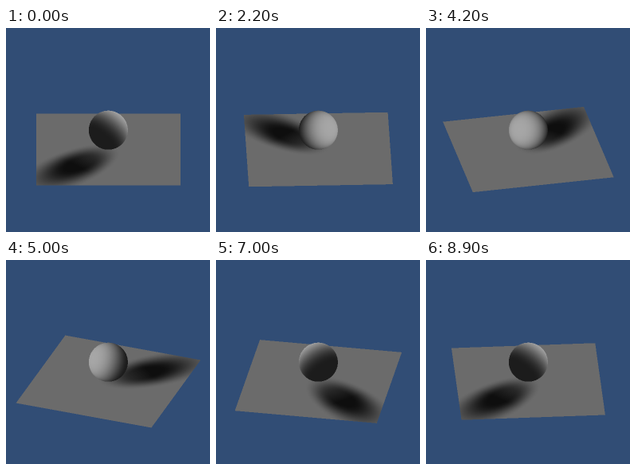
An HTML page with a canvas for the animation above (9000 ms loop, 256 by 256 pixels).

```html
<!DOCTYPE html>
<html lang="en">
<head>
<meta charset="utf-8">
<title>Orbiting sphere</title>
<style>
html, body { margin: 0; width: 100%; height: 100%; overflow: hidden; background: #314d75; }
canvas { display: block; width: 256px; height: 256px; }
</style>
</head>
<body>
<canvas id="stage" width="256" height="256"></canvas>
<script>
const SIZE = 256, STEP = 100, STEPS = 90;
const BG = [49, 77, 117];
const RAD = Math.PI / 180;
const HALF = 90.4;                      // half the floor's side
const FLOOR = { x: 128.4, y: 152.5 };
const BALL = { x: 128.4, y: 128.2, r: 24.5 };
const SIN = 0.5, COS = Math.cos(30 * RAD); // camera pitch
const LIFT = (FLOOR.y - BALL.y) / COS;
const SUN = { yaw: -45, pitch: 29 };
const SUB = [0.25, 0.75];

const ctx = document.getElementById('stage').getContext('2d');
const image = ctx.createImageData(SIZE, SIZE);
const clamp = v => Math.max(0, Math.min(1, v));

function smooth(from, to, v) {
  const p = clamp((v - from) / (to - from));
  return p * p * (3 - 2 * p);
}

function sunAt(angle) {
  const yaw = SUN.yaw * RAD + angle, pitch = SUN.pitch * RAD;
  return [Math.cos(yaw) * Math.cos(pitch), Math.sin(yaw) * Math.cos(pitch), Math.sin(pitch)];
}

// Gray of the ball, or -1 outside it
function ballGray(x, y, sun) {
  const u = (x - BALL.x) / BALL.r, v = (BALL.y - y) / BALL.r;
  const rest = 1 - u * u - v * v;
  if (rest < 0) return -1;
  const w = Math.sqrt(rest);
  const dot = u * sun[0] + (w * COS - v * SIN) * sun[1] + (v * COS + w * SIN) * sun[2];
  return 28 + 140 * smooth(-0.6, 1.1, dot);
}

// Gray of the floor with the ball's soft shadow, or -1 outside it
function floorGray(x, y, sun, c, s) {
  const gx = x - FLOOR.x, gy = (y - FLOOR.y) / SIN;
  if (Math.abs(gx * c + gy * s) > HALF || Math.abs(gy * c - gx * s) > HALF) return -1;
  // distance towards the sun, and how far that ray misses the ball
  const along = -gx * sun[0] - gy * sun[1] + LIFT * sun[2];
  const gap = Math.sqrt(gx * gx + gy * gy + LIFT * LIFT - along * along) - BALL.r;
  const blur = 6 + 0.15 * Math.max(0, along);
  const shade = clamp(0.3 + along / 90) * (1 - smooth(-14, blur, gap));
  return 107 - 93 * shade;
}

function draw(step) {
  const angle = step * 360 / STEPS * RAD;
  const c = Math.cos(angle), s = Math.sin(angle), sun = sunAt(angle);
  const px = image.data;
  for (let y = 0, i = 0; y < SIZE; y++) {
    for (let x = 0; x < SIZE; x++, i += 4) {
      let gray = 0, hits = 0;
      if (y > 84 && y < 220) {
        for (const dy of SUB) for (const dx of SUB) {
          let g = ballGray(x + dx, y + dy, sun);
          if (g < 0) g = floorGray(x + dx, y + dy, sun, c, s);
          if (g >= 0) { gray += g; hits++; }
        }
      }
      for (let k = 0; k < 3; k++) px[i + k] = (gray + BG[k] * (4 - hits)) / 4;
      px[i + 3] = 255;
    }
  }
  ctx.putImageData(image, 0, 0);
}

const start = performance.now();
let shown = -1;
function tick() {
  const step = Math.floor((performance.now() - start) / STEP) % STEPS;
  if (step !== shown) draw(shown = step);
  requestAnimationFrame(tick);
}
tick();
</script>
</body>
</html>
```
